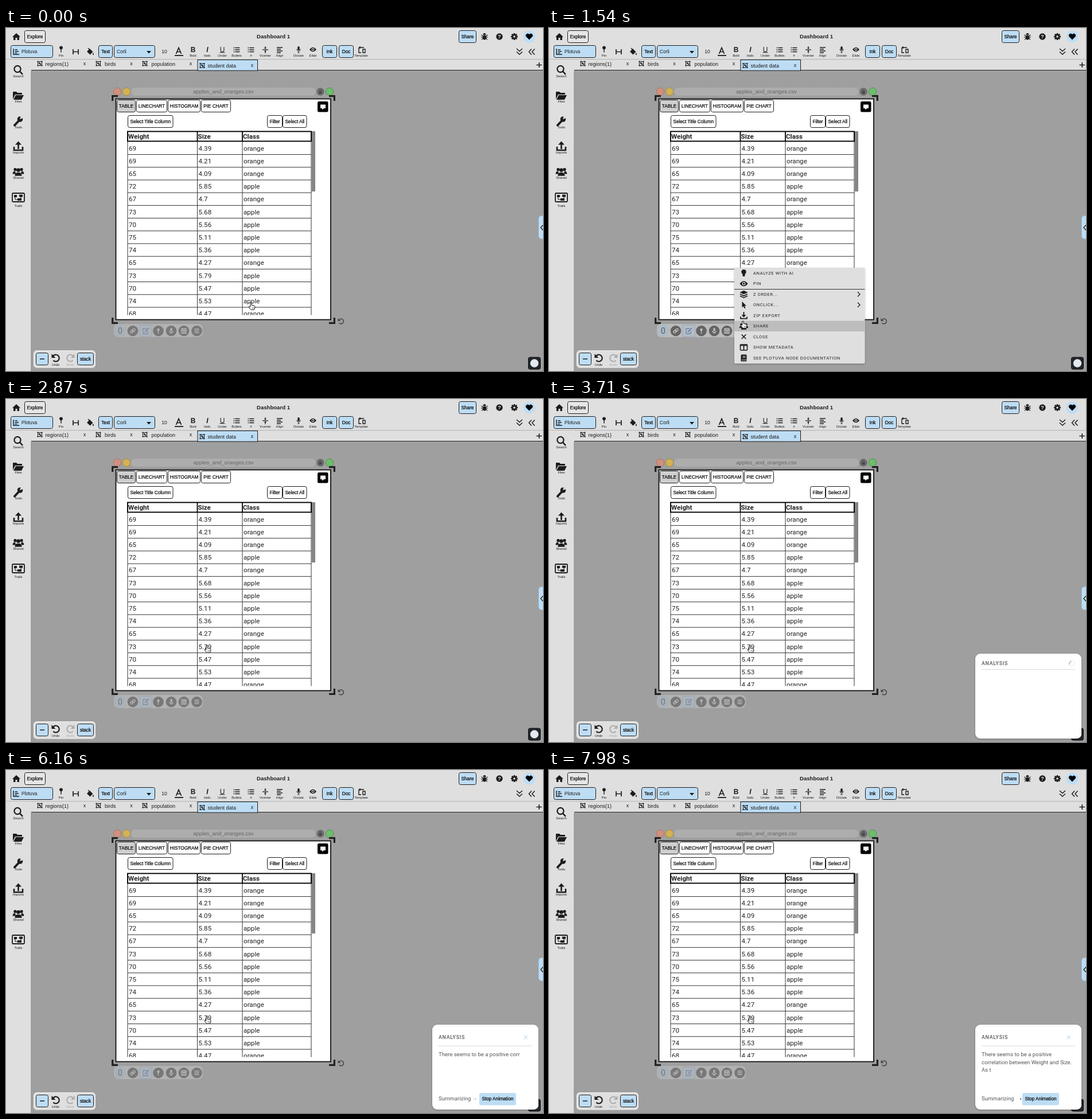
Recreate the animation shown at these times as an HTML page. Size 936 by 598 pixels, loop 8 s.

```html
<!DOCTYPE html>
<html lang="en">
<head>
<meta charset="utf-8">
<title>Dashboard</title>
<style>
html, body { margin: 0; width: 100%; height: 100%; overflow: hidden; background: #9f9f9f; }
#stage { position: absolute; left: 0; top: 0; width: 936px; height: 598px; overflow: hidden; }
svg { display: block; font-family: "Liberation Sans", sans-serif; }
#message { position: absolute; left: 754px; top: 489px; width: 163px; color: #555;
  font: 9.58px/13.68px Roboto, sans-serif; }
</style>
</head>
<body>
<div id="stage">
<svg id="view" width="936" height="598" viewBox="0 0 936 598"></svg>
<div id="message"></div>
</div>
<script>
const LIGHT = '#dfdfdf', BLUE = '#bdddf5', INK = '#1c1c1c', GRAY = '#9f9f9f';
const ROBOTO = 'font-family="Roboto, sans-serif"';
const LOOP = 8000;

// Shape helpers: text is placed by the middle of its capitals.
const text = (x, y, s, size = 8.2, more = '') =>
  `<text x="${x}" y="${(y + size * 0.36).toFixed(2)}" font-size="${size}" ${more}>${s}</text>`;
const mid = (x, y, s, size, more = '') => text(x, y, s, size, 'text-anchor="middle" ' + more);
const rect = (x, y, w, h, fill, more = '') =>
  `<rect x="${x}" y="${y}" width="${w}" height="${h}" fill="${fill}" ${more}/>`;
const dot = (x, y, r, fill, more = '') => `<circle cx="${x}" cy="${y}" r="${r}" fill="${fill}" ${more}/>`;
const solid = (d, fill = INK) => `<path d="${d}" fill="${fill}"/>`;
const line = (d, w = 1, color = INK, more = '') =>
  `<path d="${d}" fill="none" stroke="${color}" stroke-width="${w}" ${more}/>`;
const at = (x, y, s, scale = 1) => `<g transform="translate(${x} ${y}) scale(${scale})">${s}</g>`;
const group = (id, s, more = '') => `<g id="${id}" ${more}>${s}</g>`;
const button = (x1, y1, x2, y2, fill, label) =>
  rect(x1 + .5, y1 + .5, x2 - x1 - 1, y2 - y1 - 1, fill, `rx="3" stroke="${INK}"`) +
  (label ? mid((x1 + x2) / 2, (y1 + y2) / 2, label, 8.2, 'fill="#000" stroke="#000" stroke-width=".2"') : '');

// Icons are drawn around 0,0.
const icon = {
  home: solid('M-7 .5L0-6 7 .5H5V6H1.5V2h-3v4H-5V.5z'),
  pin: dot(0, -3, 3.2, INK) + line('M0 0V6', 1.6),
  eye: solid('M-7 0Q0-9 7 0Q0 9-7 0z') + dot(0, 0, 2.9, LIGHT) + dot(0, 0, 1.6, INK),
  mic: rect(-1.9, -6, 3.8, 7.5, INK, 'rx="1.9"') + line('M-3.5-1a3.5 4 0 0 0 7 0M0 3V6M-2 6H2', 1),
  list: line('M-3-4H6M-3 0H6M-3 4H6', 1.7) + line('M-6-4h1.7M-6 0h1.7M-6 4h1.7', 1.7),
  chart: line('M-5-5V5H5', 1.4) + line('M-2.5-3H2M-2.5 0H4M-2.5 2.6H1', 1.4),
  frame: rect(-3.5, -3.5, 7, 7, 'none', `stroke="${INK}" stroke-width="1"`) +
    rect(-2, -2, 2.4, 2.4, INK) + rect(-.2, -.2, 2.4, 2.4, INK) +
    [-3.5, 3.5].map(x => rect(x - 1, -4.5, 2, 2, INK) + rect(x - 1, 2.5, 2, 2, INK)).join(''),
  undo: line('M-4.5-2.5A5.2 5.2 0 1 1-4 4', 1.9) + solid('M-6.5-6V0H-.5z'),
  people: dot(-5, -3, 2.4, INK) + dot(5, -3, 2.4, INK) + dot(0, -2, 3, INK) +
    solid('M-9 4q0-4.5 4-4.5L-4 4zM9 4Q9-.5 5-.5L4 4zM-5.5 7q0-5.5 5.5-5.5T5.5 7z'),
  download: line('M0-6V1', 2) + solid('M-4-1H4L0 3.4z') + line('M-5.5 2V5.5h11V2', 1.8),
  bulb: dot(0, -2, 4.2, INK) + rect(-2, 1, 4, 4.8, INK, 'rx="1"'),
  layers: solid('M0-6.5L7-3.3 0 0-7-3.3z') + line('M-6.5-.2L0 2.8 6.5-.2M-6.5 3L0 6 6.5 3', 1.6),
  arrow: solid('M-3-6V4.5L-.6 2.5 1.2 6.4 3 5.5 1.3 1.8H4.5z'),
  cross: line('M-3.8-3.8L3.8 3.8M3.8-3.8L-3.8 3.8', 1.5),
  table: rect(-6, -5, 12, 10, 'none', `stroke="${INK}" stroke-width="1.6" rx="1"`) + line('M-6-3.4H6M0-4V5', 1.8),
  book: rect(-5, -6, 10, 12, INK, 'rx="1.5"') + line('M-2-3H3M-2-.6H3M-3.5 3.6H4.5', 1, LIGHT),
  gear: [0, 45, 90, 135].map(a => rect(-1.3, -6, 2.6, 12, INK, `transform="rotate(${a})"`)).join('') +
    dot(0, 0, 4.3, INK) + dot(0, 0, 1.8, LIGHT),
  bug: line('M-5.5-3L-3-1M5.5-3L3-1M-6 1H6M-5 5.5L-3 3M5 5.5L3 3', 1.2) +
    rect(-3.2, -2.5, 6.4, 8, INK, 'rx="3"') + solid('M-2.6-3a2.6 3 0 0 1 5.2 0z'),
  heart: solid('M0 5L-5 0a3 3 0 0 1 5-3.4A3 3 0 0 1 5 0z', '#000'),
  close: mid(0, 0, 'x', 9)
};

function header() {
  const labels = [[96, 'Pin'], [326, 'Bold'], [351, 'Italic'], [377, 'Under'], [402, 'Bullets'], [427, '#'],
    [452, 'Vcenter'], [477, 'Align'], [510, 'Dictate'], [535, 'Elide'], [619, 'Template']];
  const letter = (x, s, more) => mid(x, 37.5, s, 12, more);
  return rect(0, 0, 936, 55, LIGHT) +
    at(18, 15, icon.home) + button(32, 4, 69, 26, '#e6e6e6', 'Explore') +
    mid(466, 15, 'Dashboard 1', 9.58, 'font-weight="bold"') +
    button(789, 4, 820, 26, BLUE, 'Share') + at(834, 15, icon.bug) +
    dot(860, 15, 5.7, INK) + mid(860, 15, '?', 9, 'font-weight="bold" fill="#eee"') +
    at(886, 15, icon.gear) + dot(912, 15, 10.5, BLUE) + at(912, 15, icon.heart, 1.1) +
    button(8, 30, 82, 52, BLUE) + at(18, 41, icon.chart) + text(27, 41, 'Plotuva') +
    at(96, 37, icon.pin, .9) + line('M117 37V46M126 37V46M117 41.5H126', 1.7) +
    solid('M141 41l5-5 5.5 5.5-5 5zM152 43q2 3 0 4.2q-2-1.2 0-4.2z') + line('M143 35l4 4', 1.2) +
    button(161, 30, 186, 52, BLUE, 'Text') + button(188, 30, 260, 52, BLUE) + text(193, 41.5, 'Corli') +
    solid('M245 40h8l-4 4.5z') + mid(276, 41, '10', 8.6) +
    line('M296.5 45L301 34.5 305.5 45M298 41.5H304', 1.7) + rect(294, 47, 15, 1.8, INK) +
    letter(326, 'B', 'font-weight="bold"') + letter(351, 'I', 'font-style="italic" font-weight="bold"') +
    letter(377, 'U') + line('M372.5 42.7H381.5', 1) + at(402, 38, icon.list, .9) + at(427, 38, icon.list, .9) +
    line('M447 37.8H457M452 32V36M452 40V44', 1.3) + solid('M450 34.5h4l-2 2.6zM450 41h4l-2-2.6z') +
    line('M472 34H482M472 37H479M472 40H482M472 43H479', 1.3) +
    at(510, 37.5, icon.mic, .9) + at(535, 37.5, icon.eye, .85) +
    button(551, 30, 577, 52, BLUE, 'Ink') + button(580, 30, 606, 52, BLUE, 'Doc') +
    line('M615 34V43H619M615 34H624M617 32V36M622 37h4v6h-4z', 1.4) +
    labels.map(([x, s]) => mid(x, 47.6, s, 5.8)).join('') +
    line('M890 36l5 4.5 5-4.5M890 41.5l5 4.5 5-4.5M916 36.5l-4.5 5 4.5 5M921.5 36.5l-4.5 5 4.5 5', 1.5);
}

function tabs() {
  const plain = [[59, 68.5, 137, 'regions(1)'], [161, 172, 218.5, 'birds'], [242, 253.5, 322, 'population']];
  return rect(44, 55, 892, 19, LIGHT) + line('M0 54.7H936', .7, GRAY) + line('M44 73.5H936', 1, '#222') +
    plain.map(([i, x, c, s]) => at(i, 62, icon.frame) + text(x, 62.3, s, 9) + at(c, 62, icon.close)).join('') +
    rect(334, 55.5, 104.5, 18.7, BLUE, `stroke="${INK}"`) + at(342, 65.5, icon.frame) +
    text(351.5, 65.5, 'student data', 9) + at(429, 65, icon.close) + line('M924.5 64.5H934M929.3 60V69', 1.6);
}

function sidebar() {
  const labels = [[84, 'Search'], [128, 'Files'], [173, 'Tools'], [217, 'Imports'], [261, 'Shared'], [310, 'Trails']];
  return rect(0, 55, 44, 543, LIGHT) + line('M43.8 75V598', .7, '#777') +
    dot(20, 71.5, 5.6, 'none', `stroke="${INK}" stroke-width="2.2"`) + line('M24 75.5l5 5.5', 2.6) +
    solid('M12 124V112q0-1 1-1h5l2 2h7q1 0 1 1v2H16zM13 125l4-8h14l-4 8z') +
    line('M15 169.5L23 161', 4, INK, 'stroke-linecap="round"') + dot(24.5, 159, 4.8, INK) +
    solid('M24 159l2-6 4 4z', LIGHT) +
    line('M21.5 211V202', 2.6) + solid('M16 203.5L21.5 197.5 27 203.5z') + line('M14 207V213H29V207', 2.6) +
    at(21.5, 250, icon.people, 1.1) +
    rect(11, 288, 21, 15, 'none', `rx="1.5" stroke="${INK}" stroke-width="1.8"`) +
    rect(14, 291, 5, 4, INK) + rect(23, 290.5, 6, 4, INK) + rect(20, 297, 7, 4, INK) +
    line('M16 295V299H20M26 294V297', 1) +
    labels.map(([y, s]) => mid(21.5, y, s, 5.8)).join('');
}

function canvas() {
  let s = rect(44, 74, 892, 524, GRAY);
  for (let x = 60; x < 930; x += 44.5)
    for (let y = 92; y < 598; y += 44.5) s += dot(x, y, .6, '#8c8c8c');
  return s;
}

function dataTable() {
  const rows = ['69 4.39', '69 4.21', '65 4.09', '72 5.85', '67 4.7', '73 5.68', '70 5.56',
    '75 5.11', '74 5.36', '65 4.27', '73 5.79', '70 5.47', '74 5.53', '68 4.47'];
  const cells = rows.map((row, i) => {
    const y = 209.35 + i * 22.2, [weight, size] = row.split(' ');
    return text(214, y, weight, 11.65) + text(335.5, y, size, 11.65) +
      text(414, y, size > 5 ? 'apple' : 'orange', 11.65) + line(`M212 ${y + 11.2}H532`, 1, '#333');
  }).join('');
  const heads = [[213, 'Weight'], [334.5, 'Size'], [413, 'Class']];
  return `<clipPath id="sheet"><rect x="205" y="175" width="340" height="325.5"/></clipPath>` +
    `<g clip-path="url(#sheet)" ${ROBOTO} fill="#222">` + cells +
    line('M212 190V510M333.5 190V510M412 190V510M532 190V510', 1, '#333') + '</g>' +
    rect(212, 180.4, 320, 17, '#fff', 'stroke="#000" stroke-width="1.9"') +
    line('M333.5 181V197.5M412 181V197.5', 1.8, '#000') +
    heads.map(([x, s]) => text(x, 189, s, 11.65, ROBOTO + ' font-weight="bold" fill="#222"')).join('') +
    rect(533, 180, 6, 105, '#858585');
}

function sheet() {
  const tools = [221, 265.5, 288, 310, 332.5].map(x => dot(x, 528, 9.3, '#222')).join('');
  const bar = rect(188, 516, 155, 23, LIGHT, 'rx="8"') + rect(189, 517, 20, 21, BLUE, 'rx="9"') +
    mid(199, 528, '0', 14, ROBOTO + ' fill="#111"') + rect(233, 518, 21, 20, '#cfe1f5', 'stroke="#8cb4e2"') +
    line('M245 524H239V533H247V528', 1.3, '#2d6fc4') + line('M242 530L249 523', 2, '#2d6fc4') + tools +
    `<g stroke="#eee" stroke-width="1.3" fill="none">` +
    `<rect x="-4.8" y="-1.9" width="5.6" height="3.8" rx="1.9" transform="translate(221 528) rotate(-40)"/>` +
    `<rect x="-.8" y="-1.9" width="5.6" height="3.8" rx="1.9" transform="translate(221 528) rotate(-40)"/>` +
    `<path d="M265.5 528V533M288 531V533M285 528a3 3 0 0 0 6 0M306 524.5h8v7.5h-8zM306 527H314M308.7 527V532M311.4 527V532M308 523V525M312 523V525"/>` +
    `<path d="M328.5 525H336.5M328.5 528H336.5M328.5 531H336.5"/></g>` +
    dot(265.5, 526, 2.2, '#eee') + rect(286.5, 522.8, 3, 6, '#eee', 'rx="1.5"');
  return dot(194, 111, 6.7, '#d18f7e', 'stroke="#a9705f" stroke-width=".8"') +
    dot(210, 111, 6.7, '#d3b254', 'stroke="#9f8438" stroke-width=".8"') +
    rect(218, 104, 322, 14, '#adadad', 'rx="7"') + mid(379, 111, 'apples_and_oranges.csv', 9.5, 'fill="#666"') +
    dot(548, 111, 6.7, '#6d6d6d') + rect(545.5, 110.5, 5, 3.8, '#444') +
    line('M546.5 110.5v-1.2a1.5 1.5 0 0 1 3 0v1.2', .9, '#444') +
    dot(564, 111, 6.7, '#6dbd6d', 'stroke="#3f8a3f" stroke-width=".8"') +
    line('M185.7 127V118.6H195M563 118.6H572.4V127M185.7 505V514.3H195M563 514.3H572.4V505', 3.2, '#222') +
    rect(191.5, 123.5, 374.5, 385, '#fff', 'stroke="#111" stroke-width="1.8"') +
    button(193, 125, 226, 147, '#cfcfcf', 'TABLE') + button(227, 125, 281, 147, '#fff', 'LINECHART') +
    button(282, 125, 339, 147, '#fff', 'HISTOGRAM') + button(340, 125, 392, 147, '#fff', 'PIE CHART') +
    button(212, 152, 291.5, 174, '#fff', 'Select Title Column') + button(455, 152, 482, 174, '#fff', 'Filter') +
    button(482, 152, 524.5, 174, '#fff', 'Select All') + rect(543, 128, 18.5, 18.5, '#000', 'rx="2.5"') +
    solid('M548 133.5h9v6.5h-3.2l-1.6 2.4-1.6-2.4H548z', '#fff') + dataTable() +
    group('toolbar', bar) + `<g opacity=".65">${at(584, 511, icon.undo, .85)}</g>`;
}

function corners() {
  return rect(48.5, 562.5, 107, 29.5, LIGHT, 'rx="5" stroke="#f2f2f2"') + button(52, 566, 74, 588, BLUE) +
    line('M59 577H67', 1.5) + at(87, 575, icon.undo, 1.15) + mid(86.5, 586.5, 'Undo', 5.7) +
    `<g opacity=".25"><g transform="translate(112 575) scale(-1.15 1.15)">${icon.undo}</g>` +
    mid(112, 586.5, 'Redo', 5.7) + '</g>' + button(124, 566, 153, 588, BLUE, 'stack') +
    rect(928.5, 327.5, 14, 40, BLUE, 'rx="5" stroke="#9cc4e6"') + line('M936 343.5L932 348 936 352.5', 1.3) +
    rect(910.5, 574, 21, 21, '#22262b', 'rx="3" stroke="#111"') + dot(921, 584.5, 7.2, '#e4e9ee');
}

function menu() {
  const items = ['bulb|ANALYZE WITH AI', 'eye|PIN', 'layers|Z ORDER...', 'arrow|ONCLICK...', 'download|ZIP EXPORT',
    'people|SHARE', 'cross|CLOSE', 'table|SHOW METADATA', 'book|SEE PLOTUVA NODE DOCUMENTATION'];
  return rect(323, 418, 227.5, 167, LIGHT, 'rx="2" filter="url(#shadow)"') +
    rect(323, 0, 227.5, 18.5, '#bdbdbd', 'id="hover"') + line('M323 455.5H550.5', 1, '#333') +
    items.map((item, i) => {
      const y = 427.2 + i * 18.5, [name, label] = item.split('|');
      return at(339.5, y, icon[name], name === 'people' ? .85 : 1) +
        text(356, y, label, 7.52, ROBOTO + ' letter-spacing=".65" fill="#222"') +
        (i === 2 || i === 3 ? line(`M538 ${y - 4}l4 4-4 4`, 1.3) : '');
    }).join('');
}

function panel() {
  const title = y => text(754, y, 'ANALYSIS', 8.9, ROBOTO + ' font-weight="500" letter-spacing=".7" fill="#5a5a5a"') +
    line(`M754 ${y + (y < 465 ? 10.5 : 15)}H917`, 1, '#d9d9d9');
  return rect(743, 444, 185, 148, '#fff', 'rx="9" filter="url(#shadow)"') +
    group('waiting', title(461) + dot(911.5, 461.5, 4.6, 'none', 'stroke="#e6e6e6"') +
      line('M911.5 456.9a4.6 4.6 0 0 1 4.6 4.6', 1, '#8a8a8a', 'id="spinner"')) +
    group('answer', title(466) + line('M902.5 463l6.5 6.5M909 463l-6.5 6.5', 1, '#a9cbe6') +
      text(754, 573, 'Summarizing', 9.58, ROBOTO + ' fill="#555"') +
      [815, 818.5, 822].map(x => dot(x, 573.5, 1, '#777', 'class="pulse"')).join('') +
      rect(825, 563, 64, 21.5, BLUE, 'rx="3"') +
      mid(857, 573.5, 'Stop Animation', 8.2, 'fill="#000" stroke="#000" stroke-width=".2"'));
}

const hand = `<path d="M-1.2 1a1.2 1.2 0 0 1 2.4 0v3.4l4.6 1q1.4.4 1.2 1.8l-.7 3.2q-.3 1.8-1.6 1.8H.6q-1 0-1.6-.8L-4 7.2q.8-1.5 2.8.1z"
  fill="#fff" stroke="#111" stroke-width="1"/><path d="M1.8 8v2.5M3.5 8v2.5M5 8v2.5" stroke="#444" stroke-width=".6"/>`;

document.getElementById('view').innerHTML =
  `<filter id="shadow" x="-10%" y="-10%" width="120%" height="120%"><feDropShadow dx="0" dy="1" stdDeviation="1.5" flood-opacity=".3"/></filter>` +
  `<g fill="${INK}">` + canvas() + sheet() + header() + tabs() + sidebar() + corners() +
  group('tooltip', rect(289, 547, 87, 21, '#666', 'rx="3"') +
    mid(332.3, 557.5, 'Open Context Menu', 7.6, 'font-weight="bold" fill="#fff"')) +
  group('menu', menu()) + group('panel', panel()) + group('cursor', hand) + '</g>';

const $ = id => document.getElementById(id);
const pulses = document.querySelectorAll('.pulse');
const message = 'There seems to be a positive correlation between Weight and Size. As the';

// time, x, y of the pointer's fingertip
const route = [[0, 427, 479], [70, 427, 479], [700, 335, 525], [1400, 335, 525], [1540, 338, 511],
  [1720, 338, 511], [2030, 356, 446], [2170, 356, 446], [2350, 350, 430], [LOOP, 350, 430]];

const clamp = v => Math.max(0, Math.min(1, v));
const ease = v => v * v * (3 - 2 * v);
const easeOut = v => 1 - (1 - v) ** 3;
const ramp = (t, a, b, curve = ease) => curve(clamp((t - a) / (b - a)));

function pointer(t) {
  const i = route.findIndex(key => key[0] > t);
  const [t0, x0, y0] = route[i - 1], [t1, x1, y1] = route[i];
  const k = ramp(t, t0, t1);
  return [x0 + (x1 - x0) * k, y0 + (y1 - y0) * k];
}

const show = (id, on) => $(id).setAttribute('display', on ? 'inline' : 'none');

function draw(t) {
  const [x, y] = pointer(t);
  $('cursor').setAttribute('transform', `translate(${x} ${y})`);
  $('toolbar').setAttribute('opacity', .3 + .7 * (ramp(t, 560, 860) - ramp(t, 1330, 1880, easeOut)));
  show('tooltip', t >= 910 && t < 1330);
  show('menu', t >= 1330 && t < 2520);
  $('hover').setAttribute('y', 418 + 18.5 * Math.floor((y - 418) / 18.5));

  const answered = t >= 4480;
  show('panel', t >= 3010);
  show('waiting', !answered);
  show('answer', answered);
  $('spinner').setAttribute('transform', `rotate(${t * .36} 911.5 461.5)`);
  $('message').textContent = message.slice(0, Math.max(0, Math.floor((t - 4530) / 49.2)));
  const phase = .2 + (t - 6160) / 1240;
  pulses.forEach((p, i) =>
    p.setAttribute('r', 1.3 * Math.max(0, Math.cos(2 * Math.PI * (phase - i / 3)))));
}

const start = performance.now();
function tick() {
  draw((performance.now() - start) % LOOP);
  requestAnimationFrame(tick);
}
tick();
</script>
</body>
</html>
```
